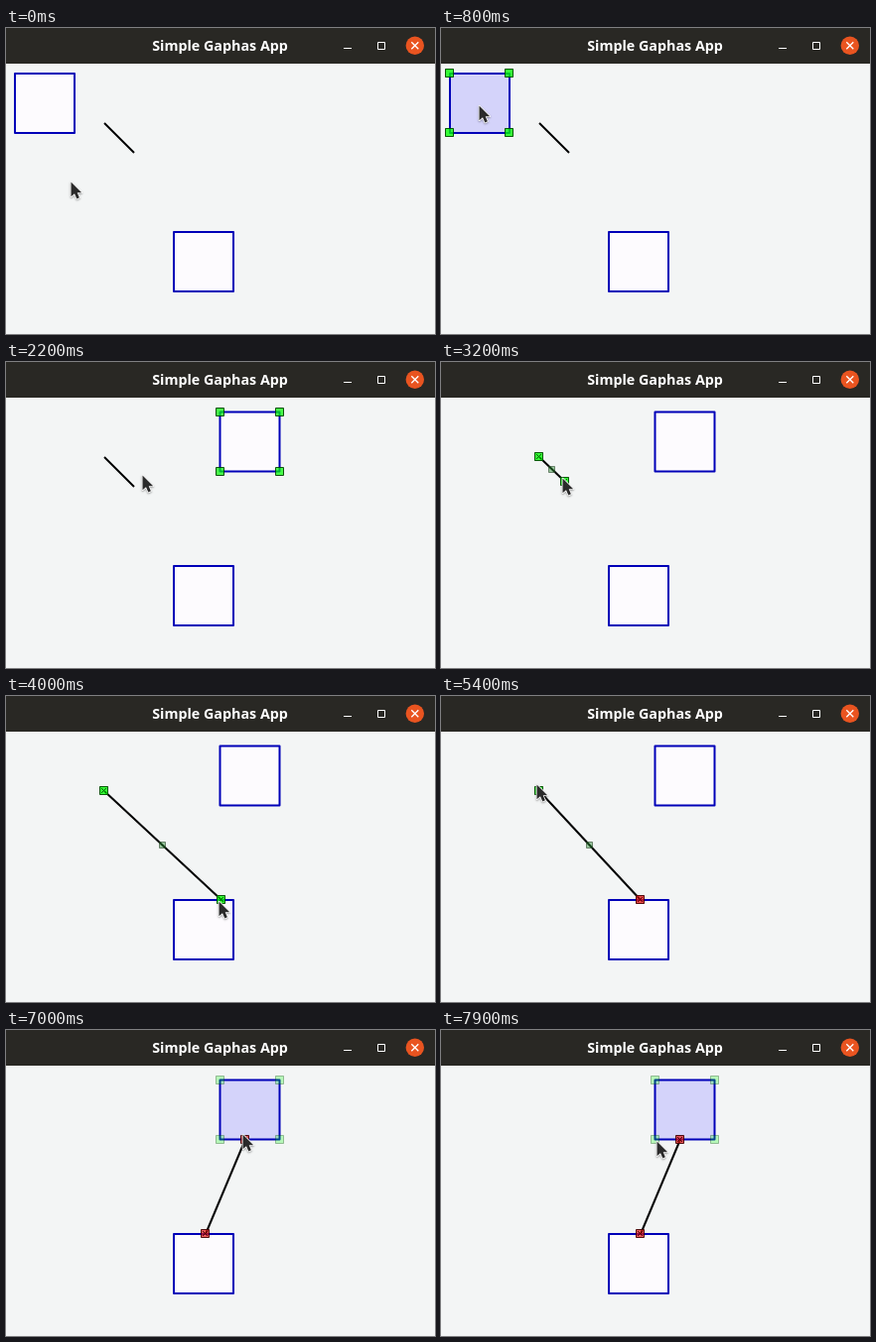
An HTML page with a canvas that plays this animation: 432x309 px, repeating every 8 s.

```html
<!DOCTYPE html>
<html lang="en">
<head>
<meta charset="utf-8">
<title>Simple Gaphas App</title>
<style>
  html, body { margin: 0; width: 100%; height: 100%; overflow: hidden; background: #f3f5f5; }
  canvas, svg { position: absolute; left: 0; top: 0; display: block; }
  text { font: bold 14.3px "Noto Sans", "Open Sans", sans-serif; fill: #fff; text-anchor: middle; }
</style>
</head>
<body>
<canvas id="view" width="432" height="309"></canvas>
<svg width="432" height="36">
  <rect width="432" height="36" fill="#292824"/>
  <text x="215.5" y="23">Simple Gaphas App</text>
  <g fill="none" stroke="#fff">
    <path d="M340 20.5h8M374.5 14.5h7v7h-7z"/>
    <circle cx="411.8" cy="17.8" r="9.2" fill="#e95420" stroke="none"/>
    <path d="M408.3 14.3l7 7m0-7l-7 7" stroke-width="1.3"/>
  </g>
</svg>
<script>
const ctx = document.getElementById('view').getContext('2d');
const LOOP = 8000, STEP = 100, BOX_SIZE = 60;

const add = ([x, y], [dx, dy]) => [x + dx, y + dy];

// Scene: a movable box, a fixed box and a line
const boxHome = [9, 46], boxDrop = [212.5, 50.5], boxNudge = [3, 0];
const fixedBox = [169, 206];
const lineStart = [99, 96], lineEnd = [129, 126];
const boxGrip = [29, 32.5], headGrip = [1.5, 7], tailGrip = [2.5, 4];
const dropBottom = boxDrop[1] + BOX_SIZE;

// Moments at which the user presses, grabs and releases
const PRESS_BOX = 800, RELEASE_BOX = 1800;
const REACH_LINE = 2300, GRAB_TAIL = 3200, RELEASE_TAIL = 4500, GLUE_TAIL = 4800;
const GRAB_HEAD = 5700, GLUE_HEAD = 6600, RELEASE_HEAD = 6700, LEAVE_LINE = 7000;

// Each gesture eases the pointer from where it is to a new place.
const rest = [65, 155];
const gestures = [];
const glide = (from, to, place) => gestures.push({ from, to, place });

glide(300, 600, add(boxHome, boxGrip));
glide(1100, 1500, add(boxDrop, boxGrip));
glide(1700, RELEASE_BOX, add(add(boxDrop, boxNudge), boxGrip));
glide(RELEASE_BOX, REACH_LINE, add(lineEnd, [-4, -8]));
glide(2600, 2800, add(lineEnd, [-6.5, -9]));
glide(GRAB_TAIL, 3500, [172, 166]);
glide(3600, 4000, add(fixedBox, [45.5, 1]));
glide(4100, RELEASE_TAIL, add(fixedBox, [29.5, 1]));
glide(4900, 5400, add(lineStart, [-3, -7]));
glide(5600, 6200, [253, 99]);
glide(6200, RELEASE_HEAD, [239.5, 107]);
glide(6900, 7200, [234, 103]);
glide(7600, 7900, [217, 112]);

function pointer(t) {
  return gestures.reduce(([x, y], { from, to, place }) => {
    const p = Math.min(1, Math.max(0, (t - from) / (to - from)));
    const k = p * p * (3 - 2 * p);
    return [x + (place[0] - x) * k, y + (place[1] - y) * k];
  }, rest);
}

function boxCorner(t) {
  if (t < PRESS_BOX) return boxHome;
  const [x, y] = pointer(Math.min(t, RELEASE_BOX));
  return [x - boxGrip[0], y - boxGrip[1]];
}

// Dragged line ends stick to the nearby box edge.
function lineTail(t) {
  if (t < GRAB_TAIL) return lineEnd;
  const [x, y] = add(pointer(Math.min(t, RELEASE_TAIL)), tailGrip);
  return [x, y > fixedBox[1] - 6 ? fixedBox[1] : y];
}

function lineHead(t) {
  if (t < GRAB_HEAD) return lineStart;
  const [x, y] = add(pointer(Math.min(t, RELEASE_HEAD)), headGrip);
  return [x, x > boxDrop[0] ? dropBottom : y];
}

function drawBox([x, y], hovered) {
  ctx.fillStyle = hovered ? '#d4d3fa' : '#fdfbfe';
  ctx.strokeStyle = '#0000b8';
  ctx.lineWidth = 2;
  ctx.lineJoin = 'round';
  ctx.beginPath();
  ctx.rect(x, y, BOX_SIZE, BOX_SIZE);
  ctx.fill();
  ctx.stroke();
}

function drawHandle([x, y], opacity, connectable, connected) {
  ctx.save();
  ctx.translate(Math.round(x) - .5, Math.round(y) - .5);
  ctx.lineWidth = 1;
  ctx.lineJoin = 'miter';
  ctx.fillStyle = `rgba(${connected ? '225,20,20' : '0,255,0'},${opacity})`;
  ctx.strokeStyle = `rgba(${connected ? '64,0,0' : '0,64,0'},${opacity * 1.3})`;
  ctx.beginPath();
  ctx.rect(-4, -4, 8, 8);
  ctx.fill();
  if (connectable) {
    ctx.moveTo(-2.5, -2.5); ctx.lineTo(2.5, 2.5);
    ctx.moveTo(2.5, -2.5); ctx.lineTo(-2.5, 2.5);
  }
  ctx.stroke();
  ctx.restore();
}

function drawSegmentHandle([x1, y1], [x2, y2]) {
  const x = Math.round((x1 + x2) / 2) - 3.5, y = Math.round((y1 + y2) / 2) - 3.5;
  ctx.lineWidth = 1;
  ctx.fillStyle = 'rgba(40,140,50,.45)';
  ctx.strokeStyle = 'rgba(40,70,40,.6)';
  ctx.fillRect(x, y, 6, 6);
  ctx.strokeRect(x, y, 6, 6);
}

const arrow = new Path2D('M.5 .5V15.3L4 12.2L6.3 17.4L8.9 16.3L6.7 11.2H11.2Z');

function drawPointer([x, y]) {
  ctx.save();
  ctx.translate(Math.floor(x), Math.floor(y));
  ctx.shadowColor = 'rgba(0,0,0,.35)';
  ctx.shadowBlur = 2;
  ctx.shadowOffsetY = 1;
  ctx.strokeStyle = '#fff';
  ctx.lineWidth = 1.6;
  ctx.stroke(arrow);
  ctx.shadowColor = 'transparent';
  ctx.fillStyle = '#2a2a2a';
  ctx.fill(arrow);
  ctx.restore();
}

function draw(t) {
  const tip = pointer(t), corner = boxCorner(t);
  const head = lineHead(t), tail = lineTail(t);
  const inBox = tip.every((v, i) => v > corner[i] - 3 && v < corner[i] + BOX_SIZE + 3);
  const lineHovered = t >= REACH_LINE && t < LEAVE_LINE;
  const boxHovered = inBox && !lineHovered;
  const lineFocused = t >= GRAB_TAIL;
  const boxFocused = t >= PRESS_BOX && !lineFocused;

  ctx.fillStyle = '#f3f5f5';
  ctx.fillRect(0, 0, 432, 309);
  drawBox(corner, boxHovered);
  drawBox(fixedBox, false);

  ctx.strokeStyle = '#000';
  ctx.lineWidth = 2;
  ctx.beginPath();
  ctx.moveTo(...head);
  ctx.lineTo(...tail);
  ctx.stroke();

  const boxHandles = opacity => {
    for (const dx of [0, BOX_SIZE])
      for (const dy of [0, BOX_SIZE]) drawHandle(add(corner, [dx, dy]), opacity);
  };
  const lineHandles = opacity => {
    drawHandle(head, opacity, true, t >= GLUE_HEAD);
    drawHandle(tail, opacity, true, t >= GLUE_TAIL);
  };
  if (boxFocused) boxHandles(.7);
  if (lineFocused) lineHandles(.7);
  if (boxHovered) boxHandles(.25);
  if (lineHovered) lineHandles(.25);
  if (lineFocused && lineHovered) drawSegmentHandle(head, tail);

  drawPointer(tip);
}

const origin = performance.now();
function tick() {
  const t = (performance.now() - origin) % LOOP;
  draw(Math.floor(t / STEP) * STEP);
  requestAnimationFrame(tick);
}
tick();
</script>
</body>
</html>
```
